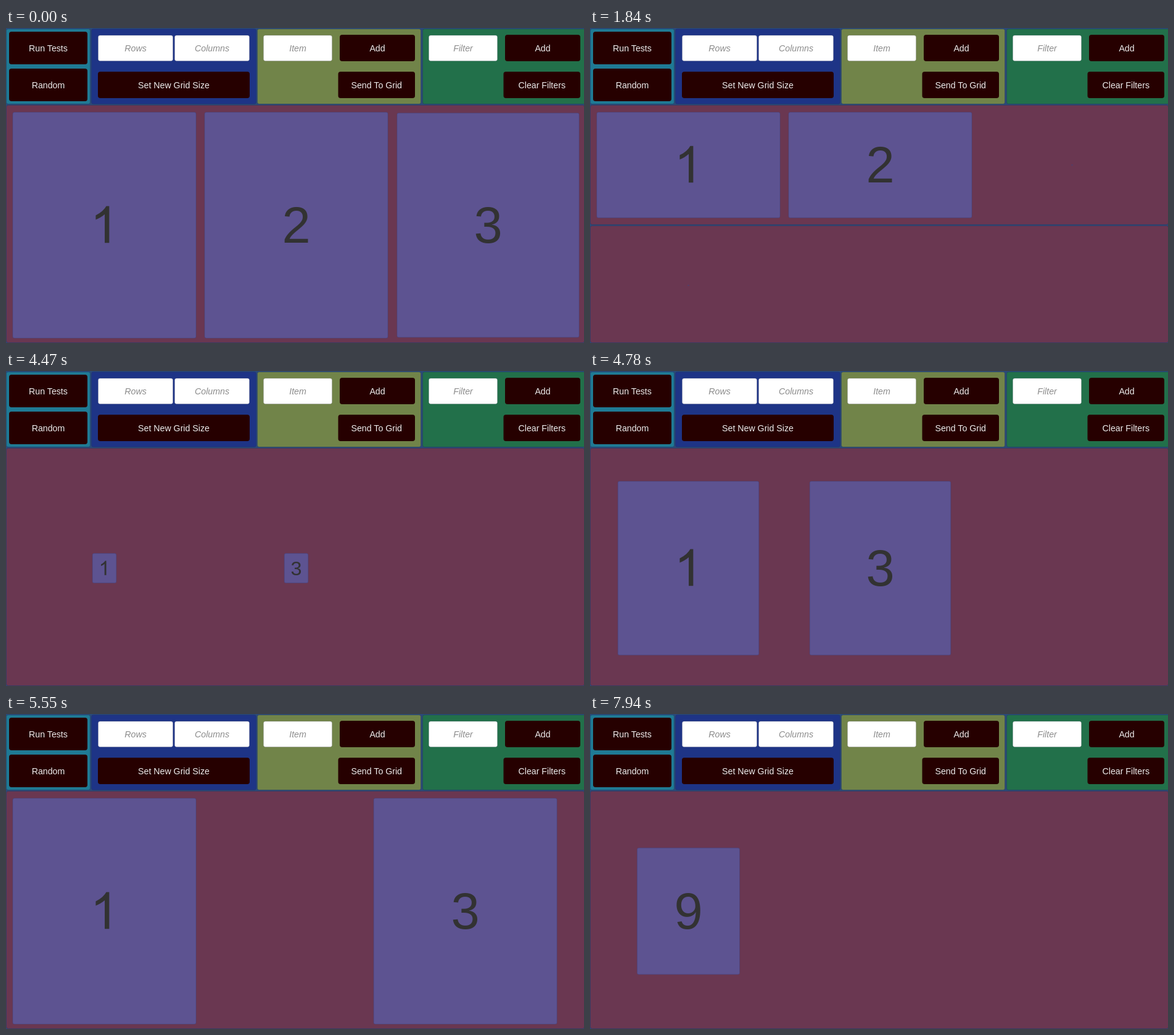
Write an HTML page that moves like this. It is 937 by 512 pixels and loops after 8000 ms.

```html
<!DOCTYPE html>
<html lang="en">
<head>
<meta charset="utf-8">
<title>Grid layout</title>
<style>
html, body { margin: 0; width: 100%; height: 100%; overflow: hidden; background: #2b4a78; }
svg { display: block; width: 937px; height: 512px; font: 14.2px "Liberation Sans", Arial, sans-serif; }
.panel { stroke: #203460; stroke-opacity: .4; }
.cell { fill: #5d5391; stroke: #3d4480; stroke-opacity: .45; }
.digit { fill: #323232; }
.button { fill: #260000; }
.field { fill: #fff; stroke: #8a8a9a; stroke-opacity: .35; }
.label { fill: #ececec; }
.hint { fill: #8c8c8c; font-style: italic; }
text { text-anchor: middle; }
</style>
</head>
<body>
<svg viewBox="0 0 937 512"><g id="bar"></g><g id="grid"></g></svg>
<script>
const LOOP = 8000, STEP = 77.16, GROW = 650;

const rect = (cls, x, y, w, h, fill = '', r = 3) =>
  `<rect class="${cls}" x="${x}" y="${y}" width="${w}" height="${h}" rx="${r}"${fill && ` fill="${fill}"`}/>`;
const panel = (x, y, w, h, fill) => rect('panel', x + .5, y + .5, w - 1, h - 1, fill);
const caption = (cls, text, x, y) => `<text class="${cls}" x="${x}" y="${y}">${text}</text>`;
const button = (text, x, y, w, h) =>
  rect('button', x, y, w, h, '', 4) + caption('label', text, x + w / 2, y + h / 2 + 5.2);
const field = (text, x, w) =>
  rect('field', x + .5, 12, w - 1, 41.5) + caption('hint', text, x + w / 2, 38.2);

document.getElementById('bar').innerHTML =
  panel(0, 1, 137, 123, '#1f7a94') + panel(138, 1, 268, 123, '#1e3486') +
  panel(407, 1, 266, 123, '#718449') + panel(675, 1, 265, 123, '#22704a') +
  button('Run Tests', 5, 6, 127, 53) + button('Random', 5, 66, 127, 53) +
  field('Rows', 149, 122) + field('Columns', 273, 122) +
  button('Set New Grid Size', 149, 71, 246, 43) +
  field('Item', 417, 112) + button('Add', 541, 11, 122, 43) +
  button('Send To Grid', 538.5, 71, 124.5, 43) +
  field('Filter', 685, 112) + button('Add', 809, 11, 122, 43) +
  button('Clear Filters', 806.5, 71, 124.5, 43);

// Each scene rebuilds the grid; every item grows in at its own start time.
const scenes = [
  { at: -LOOP, rows: 1, items: [
    { n: 1, col: 0, start: -LOOP }, { n: 2, col: 1, start: -LOOP }, { n: 3, col: 2, start: -610 }] },
  { at: 1165, rows: 2, items: [
    { n: 1, col: 0, start: 1165 }, { n: 2, col: 1, start: 1165 },
    { n: 3, col: 2, start: 1840 }, { n: 4, col: 0, row: 1, start: 1840 }] },
  { at: 4413, rows: 1, items: [
    { n: 1, col: 0, start: 4413 }, { n: 3, col: 1, start: 4413, shift: 5102 },
    { n: 2, col: 1, start: 5718 }] },
  { at: 7694, rows: 1, items: [{ n: 9, col: 0, start: 7694 }] }
];

const ease = (t, start) =>
  Math.sin(Math.min(1, Math.max(0, (t - start) / GROW)) * Math.PI / 2);

// The numeral 1 is drawn as an outline because it has no foot.
const ONE = 'M763 0H583V1147Q518 1085 412.5 1023T223 930V1104Q373 1174.5 485 1275T644 1470H763Z';

function digit(n, cx, cy, size) {
  const base = cy + size * .345, k = size / 2048;
  return n === 1
    ? `<path class="digit" role="img" aria-label="1" d="${ONE}" transform="translate(${cx - size * .278} ${base}) scale(${k} ${-k})"/>`
    : `<text class="digit" x="${cx}" y="${base}" style="font-size:${size}px">${n}</text>`;
}

function cell({ n, col, row = 0, start, shift }, rows, t) {
  const scale = ease(t, start);
  if (!scale) return '';
  const slot = col + (shift ? ease(t, shift) : 0);
  const w = 298 * scale, h = (rows === 1 ? 368 : 172.5) * scale;
  const cx = 159.5 + 311 * slot;
  const cy = rows === 1 ? 320.5 : 222.7 + 195.6 * row;
  return rect('cell', cx - w / 2 + .5, cy - h / 2 + .5, Math.max(0, w - 1), Math.max(0, h - 1), '', 2.5) +
    digit(n, cx, cy, Math.min(83, h * .66));
}

const grid = document.getElementById('grid');
function draw(now) {
  const t = 70 + STEP * Math.floor((now % LOOP - 58) / STEP);
  const { rows, items } = scenes.filter(s => s.at <= t).pop();
  const back = rows === 1
    ? panel(0, 125, 938, 387, '#6a3751')
    : panel(0, 125, 938, 195, '#6a3751') + panel(0, 321, 938, 191, '#6a3751');
  grid.innerHTML = back + items.map(item => cell(item, rows, t)).join('');
}

const origin = performance.now();
function tick() {
  draw(performance.now() - origin);
  requestAnimationFrame(tick);
}
tick();
</script>
</body>
</html>
```
